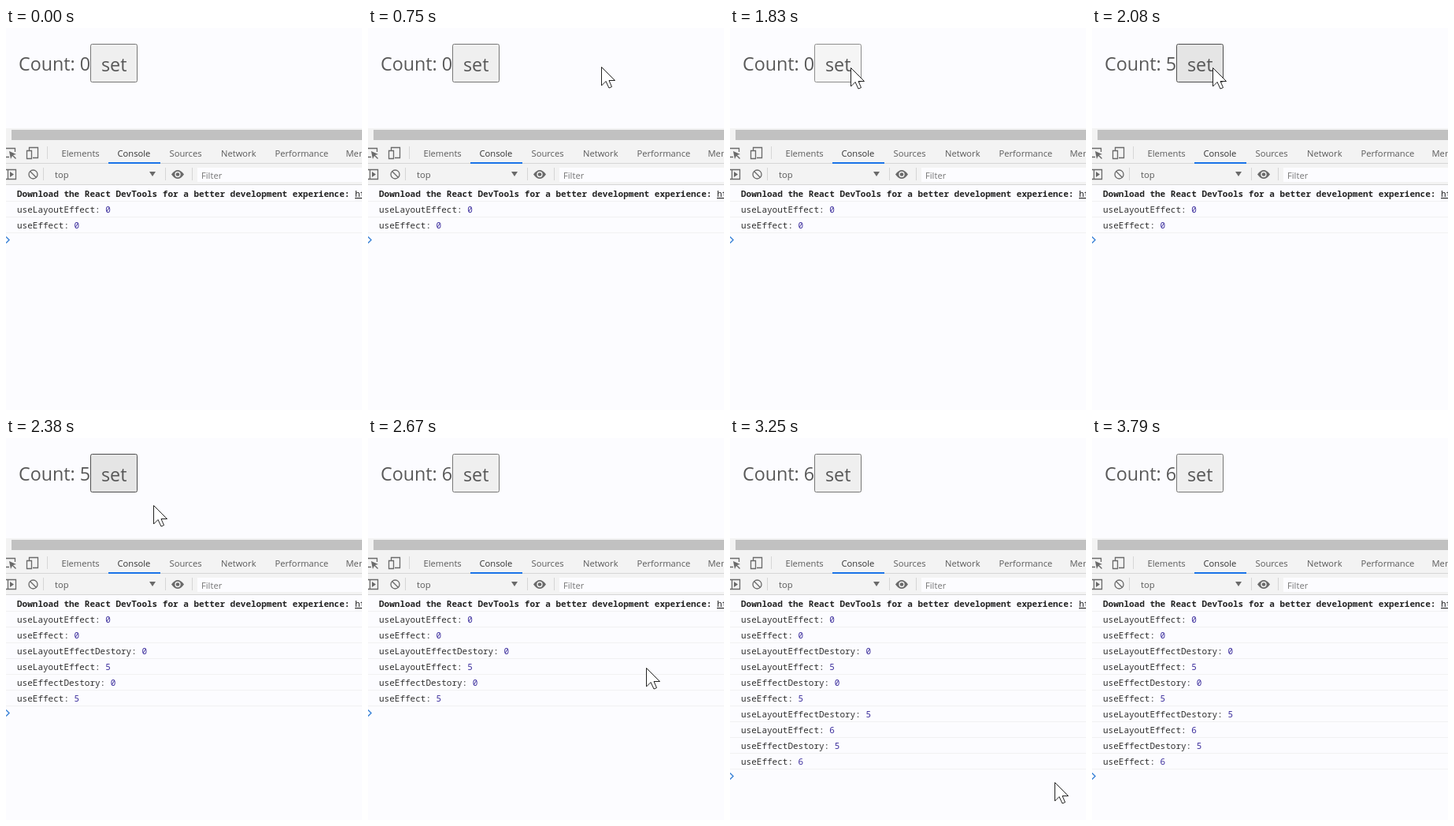
Animation of 452x484 px, one loop 4.58 s. Source, as an HTML page:

```html
<!DOCTYPE html>
<html lang="en">
<head>
<meta charset="utf-8">
<style>
  html, body { margin: 0; width: 100%; height: 100%; overflow: hidden; background: #fcfcff; }
  svg { display: block; }
  text { white-space: pre; }
  .page { font: 23.3px "Open Sans", "Noto Sans", sans-serif; fill: #585858; }
  .ui { font: 11.2px "Open Sans", "Noto Sans", sans-serif; fill: #5a5a5a; }
  .log { font: 11px "Noto Sans Mono", "DejaVu Sans Mono", monospace; fill: #303030; }
  .icon { fill: none; stroke: #6a6a6a; stroke-width: 1.3; }
  .solid { fill: #6a6a6a; stroke: none; }
</style>
</head>
<body>
<svg width="452" height="484" viewBox="0 0 452 484">
  <g class="page">
    <text id="count" x="16" y="54"></text>
    <rect id="button" x="107.5" y="20.5" width="59" height="48" rx="2"/>
    <text x="121" y="55">set</text>
  </g>

  <!-- scrollbar and the two toolbars -->
  <path fill="#f3f3f3" d="M0 127h452v72H0z"/>
  <path fill="#c1c1c1" d="M7 129h445v13H7z"/>
  <path fill="#fcfcff" d="M243 177h209v18H243z"/>
  <path stroke="#d6d6d6" d="M0 171.5H452M0 198.5H452M52.5 150v16M47.5 177v16M202.5 177v16M236.5 177v16"/>
  <path fill="#1a73e8" d="M130 170h66v2h-66z"/>
  <g class="ui">
    <text x="70.5" y="163">Elements</text>
    <text x="141.5" y="163" fill="#333">Console</text>
    <text x="207.5" y="163">Sources</text>
    <text x="273" y="163">Network</text>
    <text x="341.5" y="163">Performance</text>
    <text x="431.5" y="163">Memory</text>
    <text x="62" y="190">top</text>
    <text x="248" y="191" fill="#757575">Filter</text>
  </g>
  <g class="icon">
    <path d="M0 152.5H11.5V157M0 163.5H4"/>
    <path class="solid" d="M4 156l9 4-4 1 4 4-1 1-4-4-2 4z"/>
    <path d="M29.5 155V151.5H40.5V164.5H34M26.5 155.5h6v10h-6z"/>
    <path d="M0 179.5H12.5V191.5H0M2.5 179V192"/>
    <path class="solid" d="M5 182l5 3.5-5 3.5z"/>
    <circle cx="34.5" cy="185.5" r="5.5"/>
    <path d="M30.5 181.5l8 8"/>
    <path class="solid" d="M182 182h8l-4 6z"/>
    <path class="solid" d="M210 185.5q8-11 16 0q-8 11-16 0z"/>
    <circle cx="218" cy="185.5" r="3" fill="#6a6a6a" stroke="#f3f3f3"/>
  </g>

  <g class="log">
    <text x="14" y="214" font-weight="bold" fill="#222">Download the React DevTools for a better development experience: <tspan font-weight="normal" text-decoration="underline">https</tspan></text>
    <path stroke="#f1f1f2" d="M0 219.5H452"/>
    <g id="rows"></g>
  </g>
  <path id="prompt" fill="none" stroke="#3f86d8" stroke-width="1.5" d="M0-3.5L4 .5L0 4.5"/>
  <path id="cursor" fill="#fff" stroke="#222" d="M.5.5V24L6 18.5L10 27L13.5 25.5L10 17.5H17.5Z"/>
</svg>
<script>
const LOOP = 4580;
const $ = id => document.getElementById(id);
const [count, button, rows, prompt, cursor] =
  ["count", "button", "rows", "prompt", "cursor"].map($);

const logs = [
  ["useLayoutEffect", 0], ["useEffect", 0],
  ["useLayoutEffectDestory", 0], ["useLayoutEffect", 5],
  ["useEffectDestory", 0], ["useEffect", 5],
  ["useLayoutEffectDestory", 5], ["useLayoutEffect", 6],
  ["useEffectDestory", 5], ["useEffect", 6]
];
rows.innerHTML = logs.map(([name, value], i) => `<g>
  <text x="14" y="${234 + i * 20}">${name}: <tspan fill="#3a2c9c">${value}</tspan></text>
  <path stroke="#f1f1f2" d="M0 ${239.5 + i * 20}H452"/></g>`).join("");

// Pointer path: time, x, y
const path = [
  [250, 446, 245], [350, 402, 150], [500, 352, 65], [620, 316, 34],
  [750, 296, 49], [790, 296, 49], [1060, 200, 52], [1290, 153, 50],
  [2080, 153, 50], [2380, 187, 85], [2460, 187, 85], [2680, 360, 300],
  [2880, 409, 414], [2920, 413, 422], [3000, 413, 422],
  [3420, 412, 445], [3700, 404, 486]
];
const buttonStyles = {
  normal: ["#efefef", "#767676"],
  hover: ["#e5e5e5", "#4f4f4f"],
  active: ["#f5f5f5", "#8d8d8d"]
};

function pointerAt(t) {
  const i = path.findIndex(p => p[0] > t);
  if (i < 1) return null;
  const [t0, x0, y0] = path[i - 1], [t1, x1, y1] = path[i];
  const k = (t - t0) / (t1 - t0);
  return [x0 + (x1 - x0) * k, y0 + (y1 - y0) * k];
}

function draw(t) {
  count.textContent = "Count: " + (t < 2080 ? 0 : t < 2650 ? 5 : 6);

  const state = t >= 1830 && t < 1930 ? "active"
    : t >= 1240 && t < 2650 ? "hover" : "normal";
  const [fill, stroke] = buttonStyles[state];
  button.setAttribute("fill", fill);
  button.setAttribute("stroke", stroke);

  const shown = t < 2130 ? 2 : t < 3100 ? 6 : 10;
  [...rows.children].forEach((row, i) => row.style.display = i < shown ? "" : "none");
  prompt.setAttribute("transform", `translate(0 ${228 + shown * 20})`);

  const spot = pointerAt(t);
  cursor.style.display = spot ? "" : "none";
  if (spot) cursor.setAttribute("transform", `translate(${spot.map(Math.round)})`);
}

const start = performance.now();
function tick() {
  draw((performance.now() - start) % LOOP);
  requestAnimationFrame(tick);
}
tick();
</script>
</body>
</html>
```
